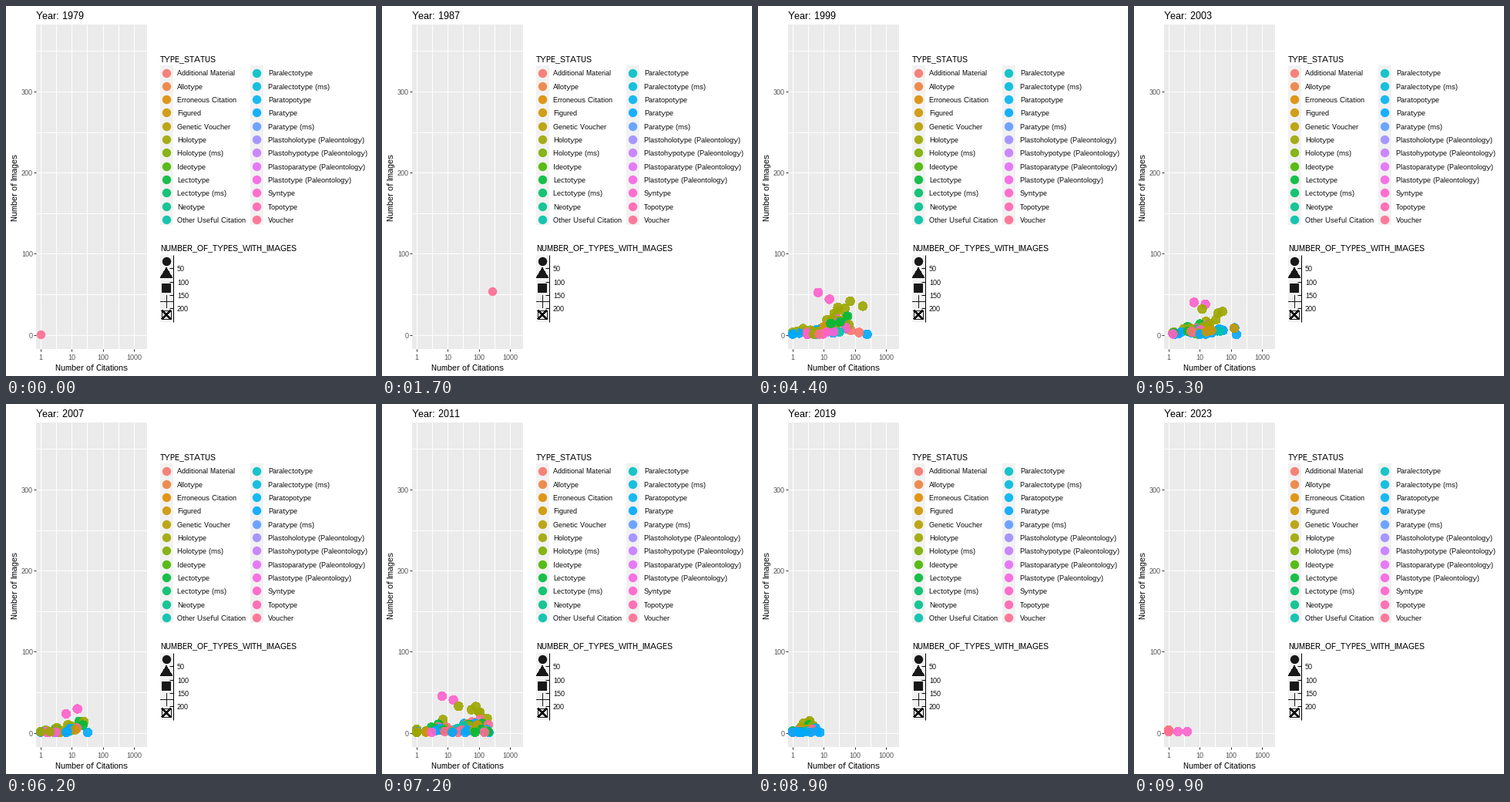
Recreate the animation shown at these times as a matplotlib script. Size 480 by 480 pixels, loop 10000 ms.

```python
import numpy as np
import matplotlib.pyplot as plt
from matplotlib.animation import FuncAnimation
from matplotlib.collections import LineCollection
from matplotlib.patches import Rectangle

# whole-pixel hinting keeps small text crisp
plt.rcParams.update({
    "font.family": "Liberation Sans",
    "text.hinting": "native",
    "text.hinting_factor": 1,
})

SIZE, DPI, FRAMES, STEP = 480, 72, 100, 100    # 72 dpi: one point is one pixel
FIRST, LAST, BUSY = 1979, 2023, 1993
R = 5.7                                        # marker radius
ALPHA = 0.9

TYPES = [
    "Additional Material", "Allotype", "Erroneous Citation", "Figured",
    "Genetic Voucher", "Holotype", "Holotype (ms)", "Ideotype", "Lectotype",
    "Lectotype (ms)", "Neotype", "Other Useful Citation", "Paralectotype",
    "Paralectotype (ms)", "Paratopotype", "Paratype", "Paratype (ms)",
    "Plastoholotype (Paleontology)", "Plastohypotype (Paleontology)",
    "Plastoparatype (Paleontology)", "Plastotype (Paleontology)",
    "Syntype", "Topotype", "Voucher",
]
ADD, FIG, HOLO, LECTO, OTHER, PARA, SYN, TOPO, VOUCH = map(TYPES.index, (
    "Additional Material", "Figured", "Holotype", "Lectotype",
    "Other Useful Citation", "Paratype", "Syntype", "Topotype", "Voucher"))


def hcl(hue, c=100, l=65):
    """Polar LUV to sRGB."""
    a = np.radians(hue)
    u = c * np.cos(a) / (13 * l) + 0.1978
    v = c * np.sin(a) / (13 * l) + 0.4683
    y = ((l + 16) / 116) ** 3
    xyz = np.array([9 * y * u / (4 * v), y, y * (12 - 3 * u - 20 * v) / (4 * v)])
    m = np.array([[3.2406, -1.5372, -0.4986],
                  [-0.9689, 1.8758, 0.0415],
                  [0.0557, -0.2040, 1.0570]])
    lin = np.clip(m @ xyz, 0, 1)
    return np.where(lin > 0.0031308, 1.055 * lin ** (1 / 2.4) - 0.055, 12.92 * lin)


COLORS = np.array([hcl(15 + 15 * i) for i in range(len(TYPES))])


def gx(citations):
    return 45 + 40.5 * np.log10(citations)


def gy(images):
    return 427 - 1.052 * images


# ---- yearly data: rows of (type, citations, images) ----

# share of the rows, and how many images each type gathers per citation
MIX = {HOLO: (0.27, 1), LECTO: (0.09, 0.75), FIG: (0.09, 0.4),
       SYN: (0.1, 0.4), VOUCH: (0.1, 0.4), PARA: (0.25, 0.3),
       OTHER: (0.07, 0.3), ADD: (0.03, 0.2)}


def trend(year, *keys):
    return np.interp(year, keys[::2], keys[1::2])


def cloud(year):
    rng = np.random.default_rng(year)
    most = trend(year, 1993, 10, 1994, 22, 1995, 1700, 1996, 200, 1999, 250,
                 2007, 22, 2011, 206, 2013, 25, 2014, 11, 2023, 4)
    slope = trend(year, 1993, 2, 1999, 5, 2007, 2, 2015, 6.3, 2023, 0.3)
    n = int(trend(year, 1993, 40, 1999, 75, 2007, 50, 2015, 110, 2023, 5))

    rows = [(PARA, most, 1)]
    if most > 12:
        rows += [(SYN, 6.5, 11 * slope), (SYN, 15, 18 + 5.5 * slope)]

    # tall columns of well illustrated, rarely cited material
    tall = 306 * np.exp(-((year - 2015) / 1.5) ** 2)
    for h in np.linspace(1, 0, int(tall / 5)):
        kind = VOUCH if rng.random() < 0.15 else FIG
        rows.append((kind, rng.choice([1, 2, 3, 3]), tall * h ** 5))

    share, reach = np.array(list(MIX.values())).T
    pick = rng.choice(len(MIX), n, p=share / share.sum())
    cites = np.floor(most ** rng.random(n) ** 1.4)
    images = 1 + reach[pick] * slope * np.minimum(cites, 10) * rng.random(n) ** 1.5
    main = np.column_stack([np.array(list(MIX))[pick], cites, images])
    return np.vstack([rows, main[np.argsort(-images)]])


states = {year: cloud(year) for year in range(BUSY, LAST)}
states[LAST] = np.array([(ADD, 1, 3), (VOUCH, 1, 1), (SYN, 2, 1), (SYN, 4, 1)])
for rows in states.values():
    rows[:] = np.column_stack([rows[:, 0], gx(rows[:, 1]), gy(rows[:, 2])])

# points whose marker code slides to 16 on the way down: type, start, end, code
FALLING = [
    (HOLO, (141, 79), (57, 427), 3),
    (TOPO, (160, 58), (66.5, 427), 7),
    (TOPO, (177, 43), (64.5, 427), 3),
]


def rows_at(year, f):
    if year < BUSY:                            # one lone point
        t = year + f
        x = trend(t, 1979, 45, 1987, 149, 1989, 142, 1991, 170, 1993, 98)
        y = trend(t, 1979, 426, 1987, 367, 1989, 410, 1993, 421)
        return np.array([(VOUCH, x, y)])
    a = states[year]
    if f == 0:
        return a
    # pair rows of one type in order; leftovers are hidden between years
    b = states[year + 1]
    queue = {k: iter(b[b[:, 0] == k]) for k in set(b[:, 0])}
    rows = []
    for row in a:
        to = next(queue.get(row[0], iter(())), None)
        if to is not None:
            rows.append(row + f * (to - row))
    return np.array(rows).reshape(-1, 3)


def glyph(code, x, y):
    """Polylines of an open marker."""
    w = R * 2 ** 0.5
    plus = [[(-w, 0), (w, 0)], [(0, -w), (0, w)]]
    cross = [[(-R, -R), (R, R)], [(-R, R), (R, -R)]]
    square = [[(-R, -R), (R, -R), (R, R), (-R, R), (-R, -R)]]
    diamond = [[(-w, 0), (0, -w), (w, 0), (0, w), (-w, 0)]]
    h, b = 1.166 * R, 1.347 * R
    star = [[(0, s * h), (b, -s * h), (-b, -s * h), (0, s * h)] for s in (1, -1)]
    a = np.linspace(0, 2 * np.pi, 33)
    ring = [np.column_stack([R * np.cos(a), R * np.sin(a)])]
    inner = [np.array(c) / 2 ** 0.5 for c in cross]
    lines = {3: plus, 5: diamond, 7: square + cross, 9: diamond + plus,
             11: star, 13: ring + inner}[code]
    return [np.array(line) + (x, y) for line in lines]


# ---- fixed parts ----

fig = plt.figure(figsize=(SIZE / DPI, SIZE / DPI), dpi=DPI, facecolor="white")
ax = fig.add_axes([0, 0, 1, 1])
ax.set(xlim=(0, SIZE), ylim=(SIZE, 0))
ax.axis("off")


def box(x, y, w, h, color):
    return ax.add_patch(Rectangle((x, y), w, h, fc=color, lw=0, zorder=1))


def line(x0, y0, x1, y1, color):
    ax.plot([x0, x1], [y0, y1], color=color, lw=1, zorder=2,
            solid_capstyle="butt")


def text(x, y, s, size, color="black", **kw):
    return ax.text(x, y, s, fontsize=size, color=color, **kw)


def dots(x, y, colors):
    return ax.scatter(x, y, s=(2 * R) ** 2, c=colors, alpha=ALPHA,
                      linewidths=0, antialiased=False, zorder=3)


def solid(xy):
    ax.fill(*np.transpose(xy), color="black", alpha=ALPHA, lw=0,
            antialiased=False, zorder=3)


def strokes_of(segments, **kw):
    return ax.add_collection(
        LineCollection(segments, linewidths=1, antialiaseds=False, **kw),
        autolim=False)


panel = box(39, 24, 144, 421, "#EBEBEB")
for i in range(7):
    x = 44.6 + 20.25 * i
    line(x, 24, x, 445, "white")
for i in range(8):
    y = 426.6 - 52.6 * i
    line(39, y, 183, y, "white")
for i in range(4):
    x, y = 44.6 + 40.5 * i, 426.6 - 105.2 * i
    line(x, 445, x, 448, "#333333")
    line(36, y, 39, y, "#333333")
    text(x + 0.5, 459, str(10 ** i), 9, "#4D4D4D", ha="center")
    text(35, y + 4, str(100 * i), 9, "#4D4D4D", ha="right")
text(111, 473, "Number of Citations", 11, ha="center")
text(12.5, 235.5, "Number of Images", 11, ha="center", va="center", rotation=90)
title = text(39, 17, "", 13)

KX = 208
text(200, 72, "TYPE_STATUS", 11)
for i, name in enumerate(TYPES):
    col, row = divmod(i, 12)
    x, y = KX + 117 * col, 86.5 + 17.3 * row
    if row == 0:
        box(x - 8, 77, 17, 207, "#F2F2F2")
    dots([x], [y], [COLORS[i]])
    text(x + 14 + col, y + 4, name, 9)

text(200, 317, "NUMBER_OF_TYPES_WITH_IMAGES", 11)
box(200, 323, 17, 87, "#F2F2F2")
keys = [331 + 17.4 * i for i in range(5)]
dots([KX], keys[:1], ["black"])
solid([(KX, keys[1] - 1.554 * R), (KX + 1.347 * R, keys[1] + 0.777 * R),
       (KX - 1.347 * R, keys[1] + 0.777 * R)])
solid([(KX + R * i, keys[2] + R * j)
       for i, j in ((-1, -1), (1, -1), (1, 1), (-1, 1))])
strokes_of(glyph(3, KX, keys[3]) + glyph(7, KX, keys[4]),
           colors="black", alpha=ALPHA, zorder=3)
line(216.6, 323, 216.6, 410, "black")
for i in range(4):
    y = keys[i] + 9.2
    line(212, y, 217, y, "black")
    text(222, y + 4, str(50 * (i + 1)), 9)

# ---- moving parts ----

points = dots([], [], None)
strokes = strokes_of([], zorder=4)
points.set_clip_path(panel)
strokes.set_clip_path(panel)


def draw(i):
    whole, rest = divmod((LAST - FIRST) * i, FRAMES - 1)
    year, f = FIRST + whole, rest / (FRAMES - 1)
    title.set_text(f"Year: {int(year + f + 0.5)}")

    rows = rows_at(year, f)
    points.set_offsets(rows[:, 1:])
    points.set_facecolor(COLORS[rows[:, 0].astype(int)])

    lines, tints = [], []
    if year == BUSY:
        for kind, start, end, code in FALLING:
            x, y = np.array(start) * (1 - f) + np.array(end) * f
            part = glyph(int(code + (16 - code) * f + 1e-6), x, y)
            lines += part
            tints += [COLORS[kind]] * len(part)
    strokes.set_segments(lines)
    strokes.set_color(tints if tints else "none")
    return points, strokes, title


anim = FuncAnimation(fig, draw, frames=FRAMES, interval=STEP, repeat=True,
                     repeat_delay=0, blit=False)
plt.show()
```
